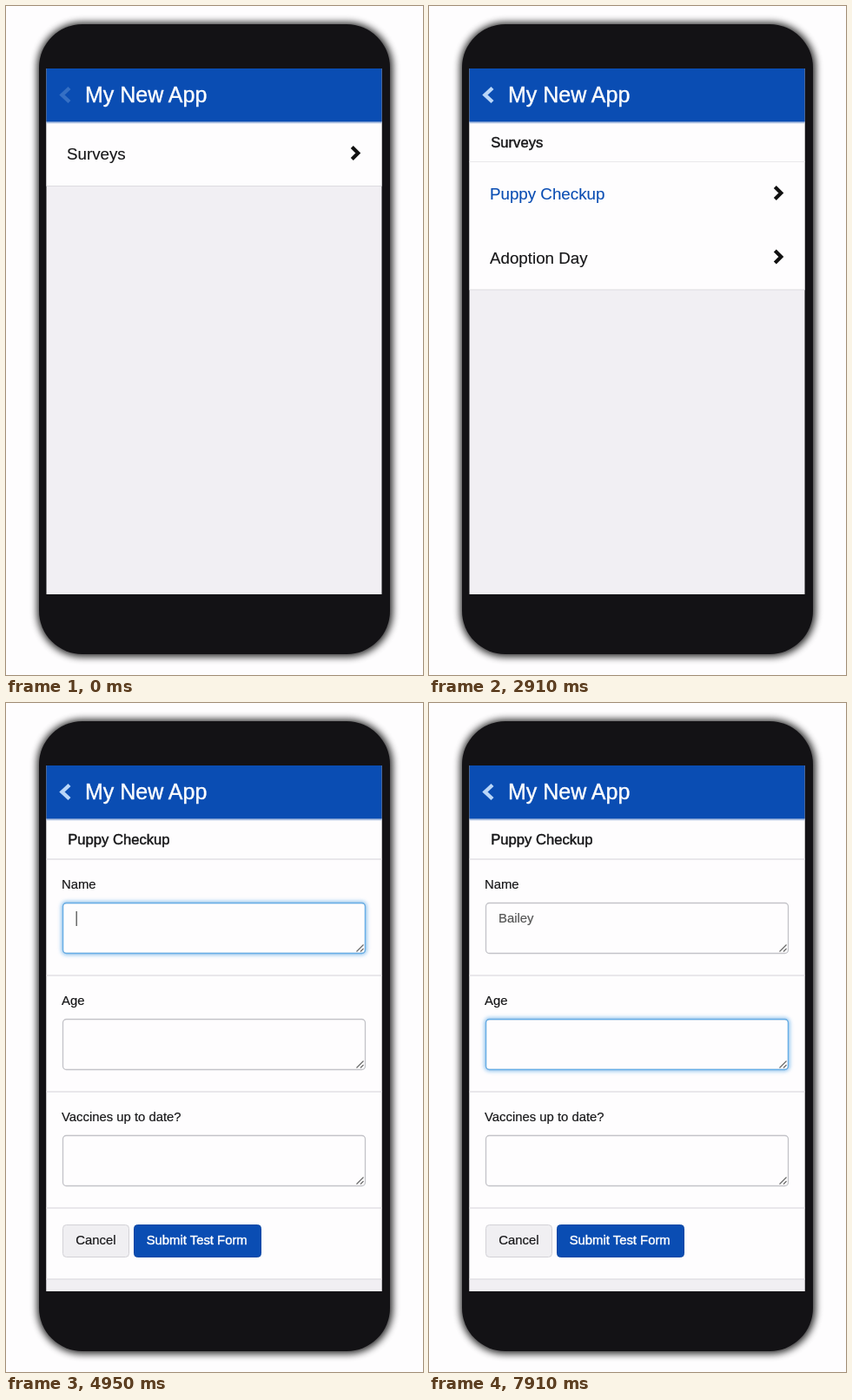
These frames come from a looping animation (480 px wide and 771 px high, 8000 ms). An HTML page:

```html
<!DOCTYPE html>
<html lang="en">
<head>
<meta charset="utf-8">
<title>Survey app</title>
<style>
  html, body { margin: 0; width: 100%; height: 100%; overflow: hidden; background: #fefdfe; }
  svg { display: block; width: 100vw; height: 100vh; font-family: "Liberation Sans", Arial, sans-serif; }
  text { fill: #161618; stroke: #161618; stroke-width: .12; white-space: pre; }
  .item { font-size: 18.75px; }
  .heading { font-size: 16.6px; stroke-width: .45; }
  .label { font-size: 14.85px; stroke-width: .2; }
  .typed { fill: #555; stroke: #555; }
  .white { fill: #fff; stroke: #fff; stroke-width: .4; }
</style>
</head>
<body>
<svg id="stage" viewBox="0 0 480 771" xmlns="http://www.w3.org/2000/svg">
  <defs>
    <filter id="soft" x="-10%" y="-10%" width="120%" height="120%"><feGaussianBlur stdDeviation="4"/></filter>
    <filter id="glow" x="-5%" y="-20%" width="110%" height="140%"><feGaussianBlur stdDeviation="2.2"/></filter>
    <linearGradient id="edge" x2="0" y2="1">
      <stop offset="0" stop-color="#5c84c4"/><stop offset="1" stop-color="#e8eef8" stop-opacity="0"/>
    </linearGradient>
  </defs>
  <rect width="480" height="771" fill="#fefdfe"/>
  <rect x="36" y="19" width="409" height="731" rx="52" fill="#000" opacity=".85" filter="url(#soft)"/>
  <rect x="38" y="21" width="404" height="726" rx="50" fill="#131215"/>
  <rect x="46.5" y="72" width="386" height="606" fill="#f1eff3"/>
  <g id="screens"></g>
  <rect x="46.5" y="72" width="386" height="61.5" fill="#0a4db3"/>
  <rect x="46.5" y="133.5" width="386" height="3" fill="url(#edge)"/>
  <path id="back" d="M73 94.5 64.5 102.5 73 110.5" fill="none" stroke="#b9d6f8" stroke-width="4.4"/>
  <text class="white" x="91" y="111" font-size="25">My New App</text>
</svg>
<script>
const LOOP = 8000;
const BLINK = 500;
const BLUE = '#0a4db3';
const INK = '#161618';

const TO_LIST = 2095, TO_FORM = 3690, FADE = 250;
const HOVER_SURVEYS = 1900, HOVER_PUPPY = 2900;
const FOCUS_NAME = 4480, FOCUS_AGE = 7250, FOCUS_FADE = 250;
const CARET_AGE = 7320;
const WORD = 'Bailey';
const KEYS = [5190, 5360, 6000, 6230, 6360, 6500];

const $ = id => document.getElementById(id);
const clamp = v => Math.min(1, Math.max(0, v));
const ramp = (t, start, length) => clamp((t - start) / length);
const smooth = p => p * p * (3 - 2 * p);

const panel = (y, bottom) =>
  `<rect x="46.5" y="${y}" width="386" height="${bottom - y}" fill="#fefdfe"/>`;
const divider = (y, color = '#e2e1e5', size = 1.5) =>
  `<rect x="46.5" y="${y - size / 2}" width="386" height="${size}" fill="${color}"/>`;
const text = (kind, x, y, value, id = '') =>
  `<text class="${kind}" x="${x}" y="${y}" id="${id}">${value}</text>`;
const item = (y, value, id) => text('item', 70, y + 7, value, id) +
  `<path d="M398.3 ${y - 7.5}l7 7-7 7" fill="none" stroke="#111" stroke-width="4.2"/>`;

const box = (y, attrs) =>
  `<rect x="65.5" y="${y}" width="348" height="58" rx="4" ${attrs}/>`;
const field = (y, value, id) =>
  text('label', 64, y - 16.5, value) +
  `<g id="${id}Glow" opacity="0">${box(y, 'fill="none" stroke="#66afe9" stroke-width="4" opacity=".75" filter="url(#glow)"')}</g>` +
  box(y, 'fill="#fefdfe" stroke="#c3c3c8" stroke-width="1.3"') +
  `<g id="${id}Edge" opacity="0">${box(y, 'fill="none" stroke="#66afe9" stroke-width="1.4"')}</g>` +
  `<path d="M403.5 ${y + 56}l8-8M408 ${y + 56}l3.5-3.5" stroke="#666" stroke-width="1.1"/>`;
const button = (x, width, fill, edge) =>
  `<rect x="${x}" y="601.5" width="${width}" height="37" rx="4" fill="${fill}" stroke="${edge}"/>`;

$('screens').innerHTML = `
  <g id="home">${panel(133, 207) + divider(207.5, '#dddce0', 1) + item(170, 'Surveys', 'surveys')}</g>
  <g id="list">${panel(133, 327) + text('heading', 71.3, 163, 'Surveys') + divider(179.5, '#e9e8eb', 1) +
    item(216, 'Puppy Checkup', 'puppy') + item(289.5, 'Adoption Day', 'adoption') + divider(327, '#dddce0', 1)}</g>
  <g id="form">${panel(133, 664) + `<rect x="46.5" y="664" width="386" height="14" fill="#f1eff3"/>` +
    text('heading', 71.3, 163, 'Puppy Checkup') +
    [180, 314, 448, 582, 664].map(y => divider(y)).join('') +
    field(230.5, 'Name', 'name') + field(364.5, 'Age', 'age') + field(498.5, 'Vaccines up to date?', 'vaccines') +
    text('label typed', 80, 253, '', 'typed') +
    `<rect id="caret" width="1.1" height="17" fill="#333"/>` +
    button(65.5, 76, '#f0eff2', '#d3d2d7') + text('label', 80.3, 624, 'Cancel') +
    button(147.5, 146, BLUE, '#0a46a3') + text('label white', 161.7, 624, 'Submit Test Form')}</g>`;

function show(id, opacity) {
  $(id).setAttribute('opacity', opacity);
  $(id).style.display = opacity > 0 ? '' : 'none';
}

function tint(id, on) {
  $(id).style.fill = $(id).style.stroke = on ? BLUE : INK;
}

function focusField(id, amount) {
  show(id + 'Glow', amount);
  show(id + 'Edge', amount);
}

function drawCaret(t, typed) {
  const inAge = t >= FOCUS_AGE;
  const since = inAge ? CARET_AGE : Math.max(FOCUS_NAME, ...KEYS.filter(k => k <= t));
  const lit = t >= since && Math.floor((t - since) / BLINK) % 2 === 0;
  const offset = !inAge && typed ? $('typed').getComputedTextLength() : 0;
  $('caret').setAttribute('x', 80.6 + offset);
  $('caret').setAttribute('y', inAge ? 374 : 240);
  show('caret', lit ? 1 : 0);
}

function draw(t) {
  const list = ramp(t, TO_LIST, FADE);
  const form = ramp(t, TO_FORM, FADE);
  show('home', (1 - list) ** 2);
  show('list', list * (1 - form) ** 2);
  show('form', form);
  $('back').setAttribute('opacity', .25 + .75 * list);

  tint('surveys', t >= HOVER_SURVEYS);
  tint('puppy', t >= HOVER_PUPPY);

  const age = smooth(ramp(t, FOCUS_AGE, FOCUS_FADE));
  focusField('name', smooth(ramp(t, FOCUS_NAME, FOCUS_FADE)) * (1 - age));
  focusField('age', age);

  const typed = KEYS.filter(k => k <= t).length;
  $('typed').textContent = WORD.slice(0, typed);
  drawCaret(t, typed);
}

const start = performance.now();
function tick() {
  draw((performance.now() - start) % LOOP);
  requestAnimationFrame(tick);
}
tick();
</script>
</body>
</html>
```
